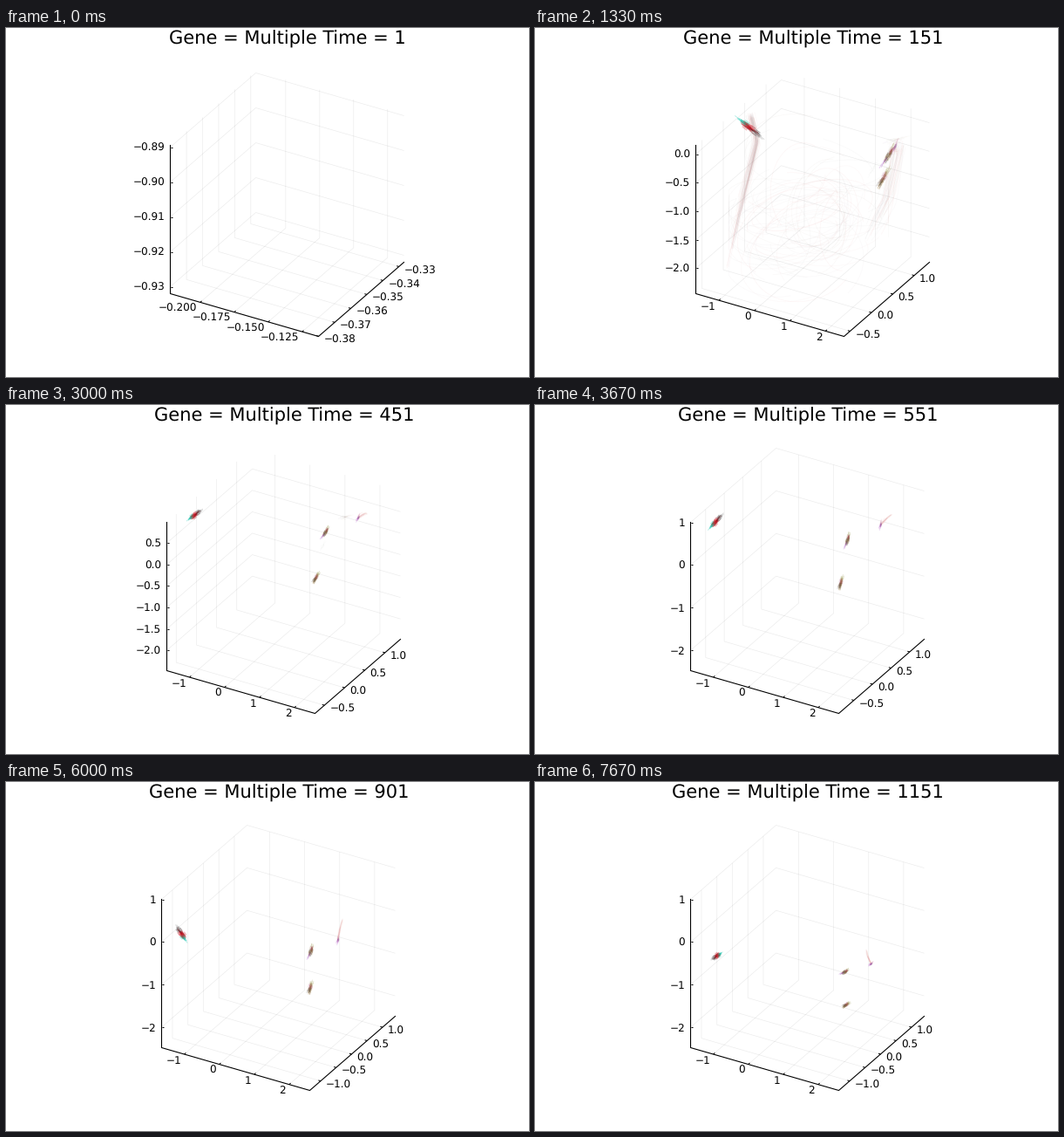
Recreate the animation shown at these times as a matplotlib script. Size 600x400 px, loop 8 s.

```python
import numpy as np
import matplotlib.pyplot as plt
from matplotlib.animation import FuncAnimation
from matplotlib.collections import LineCollection

W, H, DPI = 600, 400, 100
FRAMES = 24
PX = 72 / DPI
TITLE_SIZE, TICK_SIZE = 20.6, 11.8
plt.rcParams.update({"font.family": "DejaVu Sans", "text.hinting": "none",
                     "text.hinting_factor": 1})

fig = plt.figure(figsize=(W / DPI, H / DPI), dpi=DPI, facecolor="white")
ax = fig.add_axes([0, 0, 1, 1])

COOL = ["#18c8b4", "#22b08c", "#e01828", "#d81424", "#8c1820", "#303030", "#909090"]
WARM = ["#9a3cc0", "#b08a4a", "#555555", "#8a5a2a", "#b04a70", "#9a9a50"]
VIOLET = ["#a03cc8", "#c060c0", "#8a5090", "#d890b0"]
PINK = ["#f08080", "#f0a0a0", "#e0a080", "#d8a0c0"]
FAINT = ["#e05050", "#909090", "#e09090", "#a08070", "#b090a0"]

# waypoints of each cluster at the key steps
KEYS = np.array([2, 6, 11, 15, 20, 23])
LEFT = [(250, 113), (233, 117), (207, 133), (202, 151), (202, 187), (208, 199)]
UPPER = [(413, 148), (383, 137), (358, 154), (351, 172), (350, 206), (355, 217)]
LOWER = [(409, 167), (369, 188), (350, 204), (348, 219), (350, 246), (356, 255)]
HEAD = [(412, 140), (413, 124), (396, 137), (385, 159), (380, 194), (385, 208)]


def glide(points, i):
    """Smooth cubic path through the waypoints."""
    t = np.clip(i, KEYS[0], KEYS[-1])
    p = np.array(points, float)
    m = np.gradient(p, KEYS, axis=0)
    k = min(np.searchsorted(KEYS, t, side="right") - 1, len(KEYS) - 2)
    h = KEYS[k + 1] - KEYS[k]
    s = (t - KEYS[k]) / h
    ease = s * s * (3 - 2 * s)
    return ((1 - ease) * p[k] + ease * p[k + 1]
            + s * (1 - s) * h * ((1 - s) * m[k] - s * m[k + 1]))


def bump(i, center, width):
    return np.exp(-((i - center) / width) ** 2)


def ranges(i):
    """Limits and tick step of x, y and z."""
    if i == 0:
        return (-0.222, -0.113, 0.025), (-0.3801, -0.3269, 0.01), (-0.932, -0.8895, 0.01)
    late = 1 - (1 - np.clip((i - 8) / 10, 0, 1)) ** 1.3
    x = (-1.65, 2.59 - 0.3 * np.exp(-i / 2), 1)
    y = (-0.642 - 0.71 * late, 1.38 + 0.03 * late - 0.3 * np.exp(-i / 1.2), 0.5)
    z_max = 1 - 1.105 * (max(10 - i, 0) / 8) ** 2
    return x, y, (-2.48 + 0.1 * np.exp(-i / 3), z_max, 1 if z_max >= 1 else 0.5)


def ticks(lo, hi, step):
    digits = len(f"{step:g}".partition(".")[2])
    for n in range(int(np.ceil(lo / step)), int(np.floor(hi / step)) + 1):
        value = n * step
        yield (value - lo) / (hi - lo), f"{value:.{digits}f}".replace("-", "\u2212")


def lines(segments, width, colors, alpha=None):
    ax.add_collection(LineCollection(segments, linewidths=width * PX,
                                     colors=colors, alpha=alpha))


def label(x, y, text, ha, size=TICK_SIZE):
    ax.text(x, y + 0.365 * size, text, ha=ha, va="baseline", fontsize=size * PX)


def draw_axes(i, left):
    def at(u, v, w):
        return left + 170 * u + 98 * v, 304 + 49 * u - 85 * v - 170 * w

    grid, marks = [], []
    rx, ry, rz = ranges(i)
    for u, text in ticks(*rx):
        grid.append([at(u, 0, 0), at(u, 1, 0), at(u, 1, 1)])
        marks.append([at(u, 0, 0), at(u, 0.018, 0)])
        x, y = at(u, 0, 0)
        label(x - 3.6, y + 6.3, text, "right")
    for v, text in ticks(*ry):
        grid.append([at(1, v, 0), at(0, v, 0), at(0, v, 1)])
        marks.append([at(1, v, 0), at(0.985, v, 0)])
        x, y = at(1, v, 0)
        label(x + 6, y + 3.6, text, "left")
    for w, text in ticks(*rz):
        grid.append([at(0, 0, w), at(0, 1, w), at(1, 1, w)])
        x, y = at(0, 0, w)
        marks.append([(x, y), (x + 2, y)])
        label(x - 6.2, y + 0.3, text, "right")
    lines(grid, 0.7, "black", 0.075)
    lines(marks, 1, "black")
    ax.plot(*zip(at(0, 0, 1), at(0, 0, 0), at(1, 0, 0), at(1, 1, 0)),
            color="black", lw=1.1 * PX, solid_joinstyle="miter")


def cluster(i, center, degrees, palette, count, alpha, scale=1.0):
    """Speckled cloud that stretches, turns and rounds off with the step."""
    rng = np.random.default_rng(count)
    early, round_off = bump(i, 2, 1.5), bump(i, 20, 1.5)
    length = scale * (5 + 4 * abs(np.sin(np.pi * (i - 6) / 17)) + 10 * early - 3.5 * round_off)
    width = scale * (1.9 + early + 2 * round_off)
    angle = np.radians(degrees)
    along = np.array([np.cos(angle), np.sin(angle)])
    across = np.array([-along[1], along[0]])
    s = np.clip(rng.normal(0, 0.5, count), -1.2, 1.2)
    side = rng.normal(0, 0.5, count)
    mid = center + np.outer(s * length, along) + np.outer(side * width, across)
    half = (0.17 * length + 0.7) * along
    tone = (s + 1) / 2 * len(palette) + rng.normal(0, 0.7, count)
    index = np.clip(tone, 0, len(palette) - 1).astype(int)
    lines(np.stack([mid - half, mid + half], 1), 0.8, [palette[k] for k in index], alpha)


def bundle(points, spread, palette, count, alpha):
    """Many jittered strands along one curve."""
    rng = np.random.default_rng(count)
    points = np.array(points, float)
    t = np.linspace(0, 1, 24)
    knots = np.linspace(0, 1, len(points))
    base = np.column_stack([np.interp(t, knots, points[:, k]) for k in (0, 1)])
    strands = []
    for _ in range(count):
        wave = np.sin(t * rng.uniform(2, 7) + rng.uniform(0, 6))[:, None]
        strand = base + rng.normal(0, spread / 2, 2) + wave * rng.normal(0, spread / 3, 2)
        strands.append(strand[:rng.integers(10, 25)])
    lines(strands, 0.7, [palette[k % len(palette)] for k in range(count)], alpha)


def swirl(alpha):
    """Pale loops left behind while the paths spread out."""
    rng = np.random.default_rng(5)
    loops = []
    for _ in range(75):
        cx, cy = rng.normal((312, 215), (24, 26))
        rx, ry = rng.uniform(25, 85), rng.uniform(15, 55)
        a = rng.uniform(0, 2 * np.pi) + np.linspace(0, rng.uniform(1.2, 4), 40)
        lean = rng.uniform(-0.3, 0.2) * rx
        x = np.clip(cx + rx * np.cos(a), 222, 405)
        loops.append(np.column_stack([x, cy + ry * np.sin(a) + lean * np.cos(a)]))
    lines(loops, 0.7, [FAINT[k % len(FAINT)] for k in range(len(loops))], alpha)


def draw_paths(i):
    fade = np.clip((5 - i) / 3, 0, 1) ** 1.5
    if fade > 0:
        swirl(0.085 * fade)
        bundle([(247, 100), (254, 128), (244, 172), (233, 218), (222, 272)],
               4, FAINT, 56, 0.1 * fade)
        bundle([(416, 135), (403, 195), (380, 240)], 7, FAINT, 40, 0.08 * fade)

    turn = -35 - 50 * abs(np.sin(np.pi * (i - 6) / 17))
    drift = max(0, 1 - abs(i - 6) / 3.5)
    if drift > 0:
        x = 400 - 4 * (i - 6)
        cluster(i, (x, 128), -15, WARM, 30, 0.2 * drift)
        cluster(i, (x - 25, 161), -60, ["#909090", "#a0b0a0"], 14, 0.2 * drift, 0.6)

    wake = [glide(HEAD, i - lag) for lag in np.linspace(0, 3.5, 8)]
    bundle(wake, 0.9 + 4 * bump(i, 5, 2.5), PINK, 14, 0.12)
    cluster(i, wake[0], turn, VIOLET, 28, 0.22, 0.55)
    cluster(i, glide(UPPER, i), turn, WARM, 75, 0.25)
    cluster(i, glide(LOWER, i), turn, WARM[1:], 76, 0.28, 0.9)
    spin = -35 - 0.64 * (i - 6) ** 2 + 120 * bump(i, 2, 1.5)
    cluster(i, glide(LEFT, i), spin, COOL, 120, 0.36, 1.15)


def update(i):
    ax.clear()
    # pixel centres sit on whole numbers
    ax.set(xlim=(-0.5, W - 0.5), ylim=(H - 0.5, -0.5))
    ax.axis("off")
    left = 188 if i == 0 else 184 if i < 10 else 178
    draw_axes(i, left)
    if i > 0:
        draw_paths(i)
    label(left + 134.3, 11, f"Gene = Multiple Time = {1 + 50 * i}", "center", TITLE_SIZE)
    return []


anim = FuncAnimation(fig, update, frames=FRAMES, interval=8000 / FRAMES,
                     init_func=lambda: [], repeat=True, repeat_delay=0)
plt.show()
```
